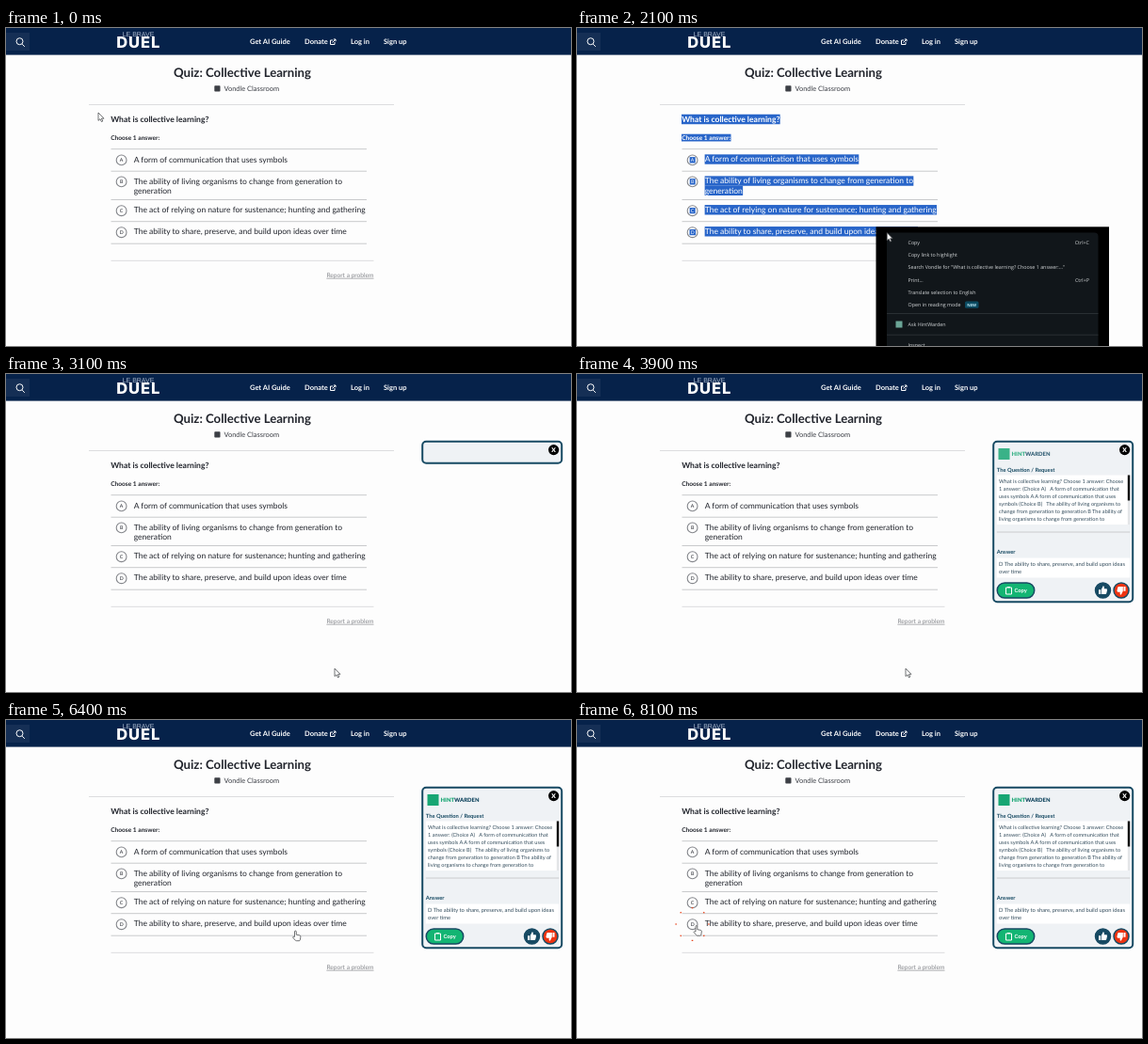
Write an HTML page that moves like this. It is 600x338 px and loops after 8.2 s.

```html
<!DOCTYPE html>
<html lang="en">
<head>
<meta charset="utf-8">
<title>Quiz: Collective Learning</title>
<style>
html, body { margin: 0; width: 100%; height: 100%; overflow: hidden; background: #fdfdfd; }
#stage { display: block; width: 100%; height: 100%; font-family: Lato, sans-serif; text-rendering: geometricPrecision; fill: #21242c; }
.bold { font-weight: 700; }
.nav { font-size: 7.5px; font-weight: 700; fill: #fff; }
.rule { stroke: #c9cacc; stroke-width: 1; }
.faint { stroke: #dcdddf; }
.ring { fill: none; stroke: #85878c; stroke-width: 1.1; }
.small { font-size: 5.8px; fill: #334c5c; }
.request { font-size: 5.6px; }
.label { font-weight: 700; fill: #174a63; }
.menu { font: 5.36px "Open Sans", sans-serif; fill: #d3d6d8; }
.badge { font-size: 4.2px; font-weight: 700; fill: #bfe8f5; }
.icon { fill: none; stroke: #fff; stroke-width: 1; }
.cursor { fill: #fff; stroke: #35383c; stroke-width: .7; stroke-linejoin: round; }
</style>
</head>
<body>
<svg id="stage" viewBox="0 0 600 338">
  <rect width="600" height="338" fill="#fdfdfd"/>

  <rect width="600" height="28.6" fill="#06224a"/>
  <rect y="5" width="25" height="19" fill="#152f55"/>
  <path class="icon" d="M17.2 17.2L19.8 19.8M18 14.2a3.5 3.5 0 1 1-7 0a3.5 3.5 0 0 1 7 0"/>
  <g text-anchor="middle">
    <text x="140.5" y="8.8" font-family="Liberation Sans, sans-serif" font-size="7" fill="#aebbd0">LE BRAVE</text>
    <text x="140.8" y="21.3" font-family="Inter, sans-serif" font-size="16.5" font-weight="800" letter-spacing="1" fill="#fff">DUEL</text>
  </g>
  <g class="nav">
    <text x="259" y="17.2">Get AI Guide</text>
    <text x="317" y="17.2">Donate</text>
    <text x="366" y="17.2">Log in</text>
    <text x="401" y="17.2">Sign up</text>
  </g>
  <path class="icon" d="M347 13H344.5V17.5H349V15M346.5 15.5L350 12M347.8 12H350V14.2" stroke-width=".9"/>

  <text x="251" y="52.2" text-anchor="middle" font-size="13.2" class="bold">Quiz: Collective Learning</text>
  <rect x="221.3" y="61.3" width="6.2" height="6.2" rx=".8" fill="#3c3f45"/>
  <text x="231.5" y="67.1" font-size="7.45" fill="#3a3d44">Vondle Classroom</text>
  <path class="rule faint" d="M88 81.5H412M111.5 247.3H390.5"/>
  <path class="rule" d="M111.5 128.7H383M111.5 152.2H383M111.5 182.5H383M111.5 205.7H383M111.5 229.2H383"/>
  <g id="lines"></g>
  <g class="ring">
    <circle cx="122.6" cy="140.4" r="5.4"/>
    <circle cx="122.6" cy="163.4" r="5.4"/>
    <circle cx="122.6" cy="194.2" r="5.4"/>
    <circle cx="122.6" cy="217.2" r="5.4"/>
  </g>
  <text x="390.5" y="264.8" text-anchor="end" font-size="6.6" fill="#85878c" text-decoration="underline">Report a problem</text>
  <path id="burst" fill="none" stroke="#e8441c" stroke-width="1.6"/>

  <g id="menu">
    <rect x="317.5" y="211.3" width="247.5" height="127" fill="#000"/>
    <path d="M329 338V221.5a4 4 0 0 1 4-4H549.5a4 4 0 0 1 4 4V338Z" fill="#11161a"/>
    <rect id="hover" x="329" y="305" width="224.5" height="20" fill="#2a3035"/>
    <path d="M329 303.5H553.5M329 326.2H553.5" stroke="#30363a" stroke-width=".8"/>
    <g class="menu">
      <text x="351.5" y="229.8">Copy</text>
      <text x="351.5" y="243">Copy link to highlight</text>
      <text x="351.5" y="256.2">Search Vondle for "What is collective learning? Choose 1 answer:..."</text>
      <text x="351.5" y="269.5">Print...</text>
      <text x="351.5" y="282.8">Translate selection to English</text>
      <text x="351.5" y="296">Open in reading mode</text>
      <text x="351.5" y="317">Ask HintWarden</text>
      <text x="351.5" y="338.8">Inspect</text>
      <g text-anchor="end">
        <text x="544" y="229.8">Ctrl+C</text>
        <text x="544" y="269.5">Ctrl+P</text>
      </g>
      <rect x="412" y="290.5" width="14.5" height="7.2" rx="1.5" fill="#0b4a61"/>
      <text x="419.2" y="295.7" text-anchor="middle" class="badge">NEW</text>
    </g>
    <rect x="338.5" y="311.5" width="7" height="7" fill="#6ba596"/>
  </g>

  <g id="panel">
    <rect id="frame" x="442.2" y="71.8" width="148" rx="4" fill="#eff2f5" stroke="#174a63" stroke-width="2"/>
    <svg id="clip" width="600" height="338">
      <g id="brand">
        <rect x="447.5" y="79" width="12" height="12" fill="#17a673"/>
        <text x="461.5" y="87.2" font-size="5.9" font-weight="900" fill="#174a63"><tspan fill="#17a673">HINT</tspan>WARDEN</text>
      </g>
      <g id="content">
        <g class="small">
          <text x="445.8" y="104.3" class="label">The Question / Request</text>
          <rect x="445.8" y="107.5" width="141.4" height="52.5" fill="#fff"/>
          <g class="request">
            <text x="448" y="116">What is collective learning? Choose 1 answer: Choose</text>
            <text x="448" y="124">1 answer: (Choice A)&nbsp;&nbsp; A form of communication that</text>
            <text x="448" y="132">uses symbols A A form of communication that uses</text>
            <text x="448" y="140">symbols (Choice B)&nbsp;&nbsp; The ability of living organisms to</text>
            <text x="448" y="148">change from generation to generation B The ability of</text>
            <text x="448" y="156">living organisms to change from generation to</text>
          </g>
          <rect x="584.8" y="107.5" width="2.4" height="52.5" fill="#e4e6e8"/>
          <rect x="584.8" y="107.5" width="2.4" height="27" fill="#111"/>
          <path class="rule" d="M445.8 168H587.2"/>
          <text x="445.8" y="191.2" class="label">Answer</text>
          <rect x="445.8" y="195.5" width="141.4" height="21" fill="#fff"/>
          <text x="448" y="204">D The ability to share, preserve, and build upon ideas</text>
          <text x="448" y="212">over time</text>
        </g>
        <g stroke="#174a63" stroke-width="1.5">
          <rect x="446.2" y="222" width="39.5" height="16" rx="8" fill="#13b573"/>
          <circle cx="558.5" cy="230" r="8" fill="#174a63"/>
          <circle cx="578" cy="230" r="8" fill="#ee3412"/>
        </g>
        <path class="icon" d="M455.5 227H461.5V234H455.5ZM457 226.5H460" stroke-width=".9"/>
        <text x="464.5" y="232" font-size="5.8" class="bold" fill="#fff">Copy</text>
        <g fill="#fff">
          <path id="thumb" d="M554 229.2H556V234H554ZM556.7 229.2L558.7 225.3Q560.3 225.3 559.8 228.3H562.2Q563.3 228.6 563 230L562.2 233.2Q562 234 561 234H556.7Z"/>
          <use href="#thumb" transform="rotate(180 568.25 230)"/>
        </g>
      </g>
    </svg>
    <circle cx="581.6" cy="80.6" r="5.6" fill="#000"/>
    <text x="581.6" y="83" text-anchor="middle" font-size="6.6" font-weight="900" fill="#fff">X</text>
  </g>

  <g id="cursor" class="cursor">
    <path id="arrow" d="M0 0V8.4L2 6.7L3.4 9.6L4.8 9L3.4 6.2H6Z"/>
    <path id="hand" d="M-1 6.4V1a.9 .9 0 0 1 1.8 0V4.2L4.4 4.9q1 .3 1 1.3L4.8 9.8q-.2 .9-1 .9H.8q-.6 0-1-.5L-3 7q.4-1.3 2-.6Z"/>
  </g>
</svg>
<script>
const LOOP = 8200, STEP = 100;
const MENU_ON = 2100, PANEL_ON = 3100;
const BURST = { start: 4030, period: 890, length: 580, x: 122.5, y: 217, radius: 18 };
const $ = id => document.getElementById(id);
const clamp = v => Math.min(1, Math.max(0, v));
const ramp = (t, from, to) => clamp((t - from) / (to - from));
const smooth = p => p * p * (3 - 2 * p);
const show = (id, on) => $(id).setAttribute("visibility", on ? "visible" : "hidden");

// text, x, baseline, size, weight
const lines = [
  ["What is collective learning?", 111.2, 99.9, 8.56, 700],
  ["Choose 1 answer:", 111.2, 118.9, 6.6, 700],
  ["A form of communication that uses symbols", 135.7, 142.5, 8.52, 400],
  ["The ability of living organisms to change from generation to", 135.7, 165.5, 8.52, 400],
  ["generation", 135.7, 175.9, 8.52, 400],
  ["The act of relying on nature for sustenance; hunting and gathering", 135.7, 196.4, 8.52, 400],
  ["The ability to share, preserve, and build upon ideas over time", 135.7, 219.4, 8.52, 400],
  ["A", 120.8, 142.2, 5.2, 400],
  ["B", 120.9, 165.2, 5.2, 400],
  ["C", 120.8, 196, 5.2, 400],
  ["D", 120.7, 219, 5.2, 400]
].map(([text, x, y, size, weight]) => {
  const single = text.length === 1;
  const pad = single ? 1.4 : 0.3;
  const height = size * 1.24;
  const top = y - size * 0.36 - height / 2;
  const font = `font-size="${size}" font-weight="${weight}"`;
  $("lines").insertAdjacentHTML("beforeend", "<g></g>");
  const group = $("lines").lastElementChild;
  group.innerHTML = `<text x="${x}" y="${y}" ${font}>${text}</text>
    <svg x="${x - pad}" y="${top}" width="0" height="${height}">
      <rect width="400" height="20" fill="#2865c9"/>
      <text x="${pad}" y="${y - top}" ${font} fill="#fff">${text}</text>
    </svg>`;
  const width = group.firstElementChild.getComputedTextLength() + 2 * pad;
  return { mark: group.lastElementChild, left: x - pad, top, bottom: top + height, width };
});

// time, x, y of the pointer tip
const path = [
  [0, 98, 90], [800, 345, 213], [900, 372, 224], [1200, 389, 229], [1300, 389, 229],
  [1800, 329.2, 217.6], [2100, 329.2, 217.6], [2900, 349, 313], [4800, 349, 313],
  [5100, 416, 244], [5600, 480, 228], [5800, 480, 228], [6400, 307.5, 224],
  [6700, 168, 221], [7400, 127, 218.5], [LOOP, 127, 218.5]
];

function pointerAt(t) {
  const i = path.findIndex(key => key[0] > t);
  const [t0, x0, y0] = path[i - 1], [t1, x1, y1] = path[i];
  const p = ramp(t, t0, t1);
  return [x0 + (x1 - x0) * p, y0 + (y1 - y0) * p];
}

function drawSelection(t, x, y) {
  for (const { mark, left, top, bottom, width } of lines) {
    let w = 0;
    if (t > 0 && t < PANEL_ON) {
      if (t >= 900 || y > bottom) w = width;
      else if (y > top - 5) w = Math.min(width, Math.max(0, x - left - 2));
    }
    mark.setAttribute("width", w);
  }
}

function drawPointer(t, x, y, menuOpen) {
  const inside = (l, r, a, b) => x > l && x < r && y > a && y < b;
  const link = inside(112, 383, 128, 229) || inside(446, 486, 222, 238);
  const hand = link && !menuOpen;
  show("hand", hand);
  show("arrow", !hand);
  $("cursor").setAttribute("transform", `translate(${x} ${y})`);
}

function drawPanel(t) {
  const height = 23 + 147.5 * smooth(ramp(t, PANEL_ON, 3800));
  $("frame").setAttribute("height", height);
  $("clip").setAttribute("height", 71 + height);
  $("content").setAttribute("opacity", ramp(t, 3300, 3800));
  $("brand").setAttribute("opacity", ramp(t, 3400, 4000));
}

function drawBurst(t) {
  const p = ((t - BURST.start) % BURST.period) / BURST.length;
  let d = "";
  if (t >= BURST.start && p < 1) {
    const outer = BURST.radius * (1 - (1 - p) ** 4);
    const inner = Math.min(outer, BURST.radius * 1.06 * p);
    for (let i = 0; i < 8; i++) {
      const c = Math.cos(i * Math.PI / 4), s = Math.sin(i * Math.PI / 4);
      d += `M${BURST.x + c * inner} ${BURST.y + s * inner}L${BURST.x + c * outer} ${BURST.y + s * outer}`;
    }
  }
  $("burst").setAttribute("d", d);
}

function draw(t) {
  const [x, y] = pointerAt(t);
  const menuOpen = t >= MENU_ON && t < PANEL_ON;
  show("menu", menuOpen);
  show("hover", menuOpen && y > 305);
  show("panel", t >= PANEL_ON);
  drawSelection(t, x, y);
  drawPanel(t);
  drawBurst(t);
  drawPointer(t, x, y, menuOpen);
}

const begin = performance.now();
function tick() {
  const t = (performance.now() - begin) % LOOP;
  draw(Math.floor(t / STEP) * STEP);
  requestAnimationFrame(tick);
}
tick();
</script>
</body>
</html>
```
